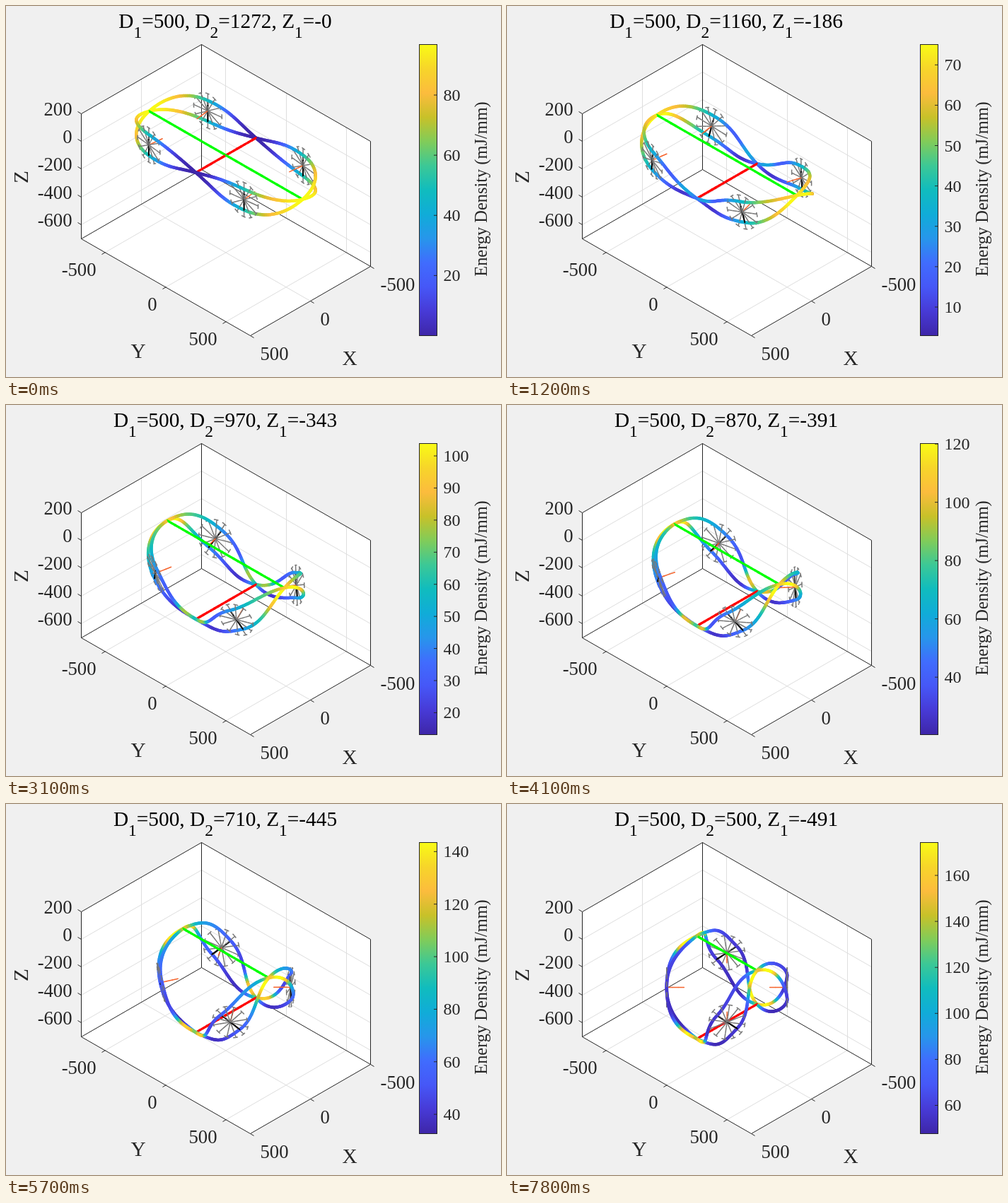
Recreate the animation shown at these times as an HTML page with a canvas. Size 700 px wide and 525 px high, loop 7.9 s.

```html
<!DOCTYPE html>
<html lang="en">
<head>
<meta charset="utf-8">
<title>Ring energy</title>
<style>
html, body { margin: 0; width: 100%; height: 100%; overflow: hidden; background: #f0f0f0; }
canvas { display: block; }
</style>
</head>
<body>
<canvas id="c" width="700" height="525"></canvas>
<script>
const ctx = document.getElementById('c').getContext('2d');
const STEPS = 79, STEP_MS = 100, INK = '#262626', GREY = '#777', RAD = Math.PI / 180;
const { sin, cos, exp, floor, ceil, round, min, max, PI } = Math;

// Evenly spaced stops of the colour scale
const SCALE = '3e26a8 473ad6 4657f7 406cfe 2796eb 10acd8 10bcbe 3cc896 81cc59 c8c129 fcbc3d f7d52a f9fb15'
  .split(' ').map(h => [0, 2, 4].map(i => parseInt(h.slice(i, i + 2), 16)));

const add = (a, b, s = 1) => a.map((x, i) => x + b[i] * s);
const mul = (a, s) => a.map(x => x * s);
const mix = (a, b, t) => add(mul(a, 1 - t), b, t);
const rgb = c => `rgb(${c.map(round).join()})`;
const project = ([x, y, z]) => [311 + .1707 * y - .17 * x, 211.2 + .098 * (x + y) - .1967 * z];

function colour(v) {
  const p = min(.9999, max(0, v)) * (SCALE.length - 1), i = floor(p);
  return rgb(mix(SCALE[i], SCALE[i + 1], p - i));
}

function hermite(a, b, ta, tb, t) {
  const u = 1 - t;
  return a.map((_, i) => u * u * (1 + 2 * t) * a[i] + t * t * (3 - 2 * t) * b[i] + t * u * (u * ta[i] - t * tb[i]));
}

// Everything follows from x: 0 = long flat ring, 1 = fully folded
function shapeAt(k) {
  const d2 = k ? 1280 - 10 * k : 1272, x = (1272 - d2) / 772;
  const z1 = -681 * x / (x + .3865);
  const sum = 640 - 140 * x, diff = 149 * (1 - x) ** 1.1;
  return {
    d2, x, z1,
    fold: -z1 / 491,
    hub: [(sum - diff) / 2, (sum + diff) / 2, z1 * (.54 - .04 * x)],
    azimuth: (6.5 + 38.5 * x) * RAD,
    tilt: 10 * RAD * sin(PI * x),
    spin: 52 * RAD * sin(PI * x / 2),
    low: x * (10 + 75 * x - 37.3 * x * x),
    high: max(96.8 - 150 * x, 36.3 + x * (222 + x * (69 * x - 153)))
  };
}

// Relative energy at s, from green node (0) to red node (1), on strand w = 1 or -1
function energy(s, w, { x, fold }) {
  const peak = d => exp(-((d / .13) ** 2));
  const flat = (1 - .85 * x) * cos(PI * s / 2) ** 2;
  return flat + .9 * x * peak(s - .08 * w) + fold * peak(s - 1 - .08 * w);
}

function stroke(points, style, width) {
  ctx.beginPath();
  points.forEach(p => ctx.lineTo(...p));
  ctx.strokeStyle = style;
  ctx.lineWidth = width;
  ctx.stroke();
}
const snap = p => project(p).map(v => floor(v) + .5);
const axisLine = (points, style) => stroke(points.map(snap), style, 1);

function setFont(size) {
  ctx.font = `${size}px "Liberation Serif", "Times New Roman", serif`;
}
function text(s, x, y, size, align = 'left', fill = INK) {
  setFont(size);
  ctx.textAlign = align;
  ctx.fillStyle = fill;
  ctx.fillText(s, x, y);
  return ctx.measureText(s).width;
}
function upright(s, x, y, size) {
  ctx.save();
  ctx.translate(x, y);
  ctx.rotate(-PI / 2);
  text(s, 0, 0, size, 'center');
  ctx.restore();
}
function axisTick(p, dx, dy, label, tx, ty, align) {
  const [x, y] = snap(p);
  stroke([[x, y], [x + dx, y + dy]], INK, 1);
  text(label, x + tx, y + ty, 26.67, align);
}

function drawAxes() {
  const back = [-500, -700, -700], grid = '#dedede';
  const box = [[500, -700, 200], [-500, -700, 200], [-500, 700, 200], [-500, 700, -700], [500, 700, -700], [500, -700, -700]];
  ctx.beginPath();
  box.forEach(p => ctx.lineTo(...snap(p)));
  ctx.fillStyle = '#fff';
  ctx.fill();
  for (let z = -600; z < 200; z += 200) axisLine([[500, -700, z], [-500, -700, z], [-500, 700, z]], grid);
  for (let y = -500; y <= 500; y += 500) axisLine([[-500, y, 200], [-500, y, -700], [500, y, -700]], grid);
  axisLine([[0, -700, 200], [0, -700, -700], [0, 700, -700]], grid);
  axisLine([...box, box[0]], INK);
  for (const i of [1, 3, 5]) axisLine([back, box[i]], INK);

  for (let z = -600; z <= 200; z += 200) axisTick([500, -700, z], -5, -3, z, -13, 2, 'right');
  for (let v = -500; v <= 500; v += 500) {
    axisTick([500, v, -700], -5, 3, v, -13, 33.5, 'right');
    axisTick([v, 700, -700], 5, 3, v, 14, 34, 'left');
  }
  text('X', 486, 508, 29.33, 'center');
  text('Y', 187, 498, 29.33, 'center');
  upright('Z', 31, 242, 29.33);
}

function drawBar({ low, high }) {
  const x = 584.5, top = 54.5, h = 412;
  const fill = ctx.createLinearGradient(0, top + h, 0, top);
  SCALE.forEach((c, i) => fill.addColorStop(i / (SCALE.length - 1), rgb(c)));
  ctx.fillStyle = fill;
  ctx.fillRect(x, top, 25, h);
  ctx.strokeStyle = INK;
  ctx.lineWidth = 1;
  ctx.strokeRect(x, top, 25, h);

  const count = s => floor(high / s) - ceil(low / s) + 1;
  let step = count(10) > 9 ? 20 : 10;
  if (step === 20 && count(20) < 6 && count(50) > 2) step = 50;
  for (let v = max(1, ceil(low / step)) * step; v <= high; v += step) {
    const y = top + h * (high - v) / (high - low);
    stroke([[605, y], [609.5, y]], INK, 1);
    text(v, 618.5, y + 8, 24);
  }
  upright('Energy Density (mJ/mm)', 680, 259, 24.4);
}

function drawTitle({ d2, z1 }) {
  const parts = ['D', '1', '=500, D', '2', `=${d2}, Z`, '1', `=-${round(-z1)}`];
  const size = i => i % 2 ? 23.46 : 29.33;
  const width = parts.reduce((w, s, i) => (setFont(size(i)), w + ctx.measureText(s).width), 0);
  let x = 310 - width / 2;
  parts.forEach((s, i) => { x += text(s, x, i % 2 ? 45 : 31, size(i), 'left', '#000'); });
}

function drawRing(shape) {
  const { d2, z1, hub, azimuth, tilt, spin } = shape;
  const lines = [];
  const bar = (a, b, style, width, n = 1) => {
    for (let i = 0; i < n; i++) {
      const p = mix(a, b, i / n), q = mix(a, b, (i + 1) / n), m = add(p, q);
      lines.push({ p, q, style, width, depth: m[0] + m[1] + m[2] });
    }
  };
  const green = [0, d2 / 2, 0], red = [250, 0, z1];
  bar([0, -d2 / 2, 0], green, '#0f0', 3.3, 30);
  bar([-250, 0, z1], red, '#f00', 3.3, 16);

  // Frame of the surface at the middle of one quarter
  const ca = cos(azimuth), sa = sin(azimuth), ct = cos(tilt), st = sin(tilt);
  const side = [-sa, ca, 0], up = [ca * st, sa * st, ct], inward = [-ca * ct, -sa * ct, st];
  const along = add(mul(side, -cos(spin)), up, -sin(spin));
  const across = add(mul(side, sin(spin)), up, -cos(spin));
  const rim = deg => {
    const a = deg * RAD - spin;
    return add(add(hub, side, 106 * sin(a)), up, 124 * cos(a));
  };

  const turn = 65 * RAD * shape.fold;
  const strand = w => {
    const mid = add(hub, across, 75 * w), lean = .27 * w * sin(turn), drop = .27 * w * cos(turn);
    const half = (a, b, ta, tb, t) => {
      const pull = 1.27 * Math.hypot(...add(a, b, -1));
      return hermite(a, b, mul(ta, pull), mul(tb, pull), t);
    };
    return s => s < .5
      ? half(green, mid, [1, lean, -drop], along, s * 2)
      : half(mid, red, along, [lean, -1, drop], s * 2 - 1);
  };

  for (const sx of [1, -1]) for (const sy of [1, -1]) {
    const flip = ([x, y, z]) => [x * sx, y * sy, z];
    const put = (a, b, ...rest) => bar(flip(a), flip(b), ...rest);
    for (let deg = 0; deg < 360; deg += 30) {
      put(hub, rim(deg), GREY, 1.5, 3);
      put(rim(deg - 6), rim(deg + 2), GREY, 1.5);
      put(rim(deg + 2), rim(deg + 10), GREY, 1.5);
    }
    put(add(hub, across, -75), add(hub, across, 75), '#000', 2, 4);
    put(hub, add(hub, inward, 102), '#f5642d', 1.5, 3);
    for (const w of [1, -1]) {
      const at = strand(w), n = 60;
      for (let i = 0; i < n; i++) put(at(i / n), at((i + 1) / n), colour(energy((i + .5) / n, w, shape)), 4.5);
    }
  }

  lines.sort((a, b) => a.depth - b.depth);
  for (const { p, q, style, width } of lines) {
    ctx.lineCap = style === GREY ? 'butt' : 'round';
    stroke([project(p), project(q)], style, width);
  }
  ctx.lineCap = 'butt';
}

const began = performance.now();
function tick() {
  const shape = shapeAt(floor((performance.now() - began) / STEP_MS) % STEPS);
  ctx.fillStyle = '#f0f0f0';
  ctx.fillRect(0, 0, 700, 525);
  drawAxes();
  drawRing(shape);
  drawBar(shape);
  drawTitle(shape);
  requestAnimationFrame(tick);
}
tick();
</script>
</body>
</html>
```
